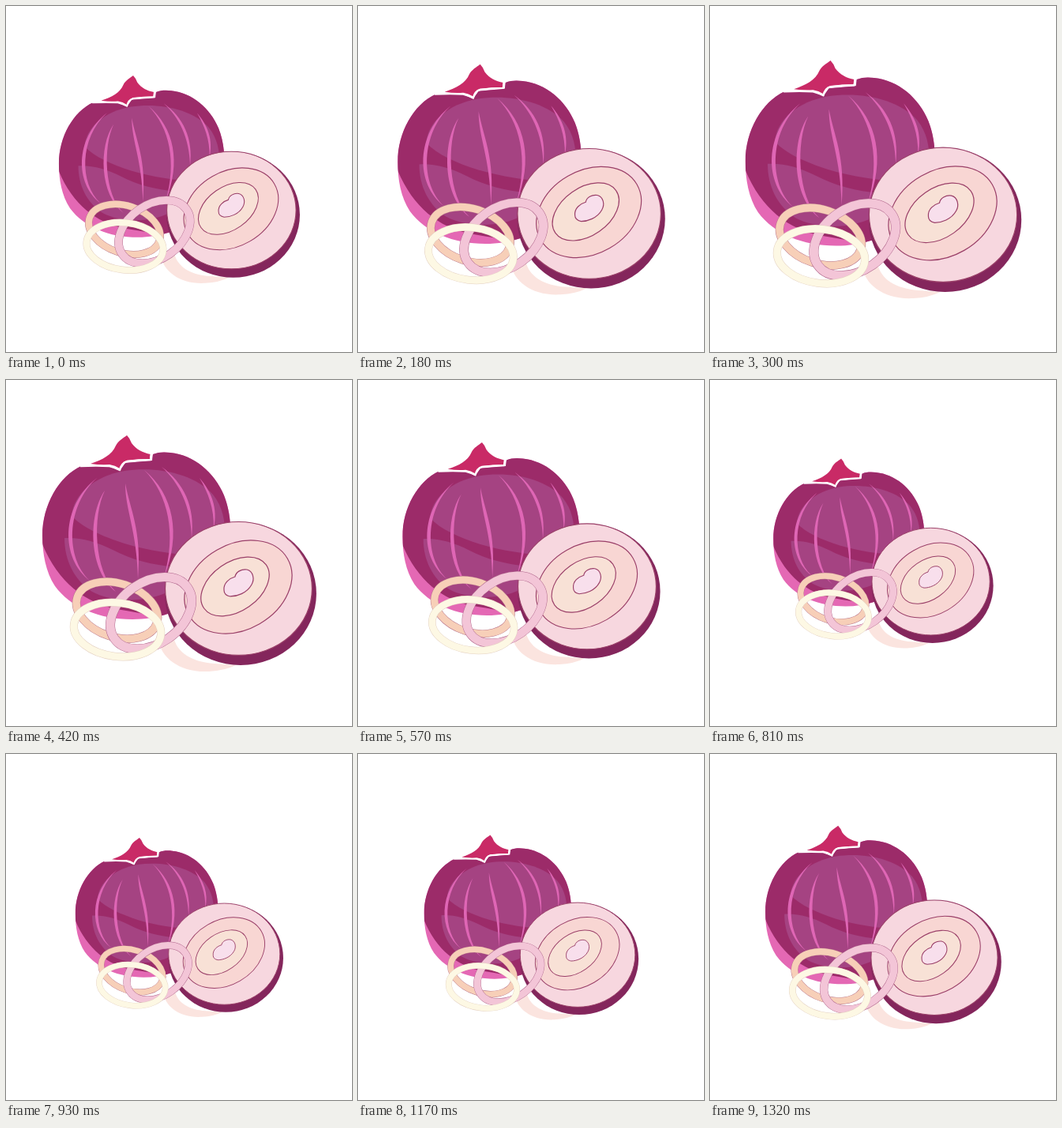
An HTML page that plays this animation: 438 px wide and 438 px high, repeating every 1350 ms.

```html
<!DOCTYPE html>
<html lang="en">
<head>
<meta charset="utf-8">
<title>Red onion</title>
<style>
  html, body { margin: 0; width: 100%; height: 100%; overflow: hidden; background: #fff; }
  svg { display: block; width: 100vw; height: 100vh; }
  .ring { fill: none; }
  .line { stroke: #9a3f68; stroke-width: 1.2; }
</style>
</head>
<body>
<svg viewBox="0 0 438 438">
  <defs>
    <path id="body" d="M95 109 L130 109 L144 115 L151 105 L185 102 L186 94 C193 91 201 91 208 92
      C238 95 264 117 276 146 C284 166 286 190 283 212 C276 262 225 303 160 303
      C118 303 82 288 62 261 C50 243 46 219 46 197 C46 158 67 122 95 109Z"/>
    <clipPath id="inBody"><use href="#body"/></clipPath>
  </defs>
  <g id="onion">
    <!-- whole bulb -->
    <use href="#body" fill="#e468b4"/>
    <g clip-path="url(#inBody)">
      <path fill="#9c2b69" d="M40 80 H300 V300 H200 C185 298 165 294 140 290 C100 282 66 256 46 208Z"/>
      <path fill="#a54382" d="M83 172 C85 145 111 122 150 115 C190 109 238 118 262 145 C274 160 278 178 277 200
        L240 222 C215 221 180 216 150 207 C122 198 97 187 83 172Z"/>
      <path fill="#a54382" d="M74 200 C95 199 115 205 135 215 C160 228 185 234 215 237 L205 268
        C180 281 137 283 109 268 C86 253 74 228 74 200Z"/>
      <g id="stripes" fill="#df66b5"/>
    </g>
    <path fill="#c92a66" d="M153 70 C148 74 142 77 139 83 C134 95 122 101 107 106 Q120 108 131 107
      Q138 108 144 112 Q146 104 153 102 Q168 100 182 100 L183 94 C173 92 165 88 159 80 Q157 74 153 70Z"/>
    <path fill="none" stroke="#fff" stroke-width="2.4" stroke-linejoin="round"
      d="M94 109 Q115 108 131 109 Q139 111 144 114 Q146 105 153 103 Q168 101 183 101 L184 91"/>

    <!-- pale slice under the half -->
    <path fill="#fbe4df" d="M193 329 C196 352 221 371 257 369 Q277 368 291 361 L264 359 C235 357 216 345 212 325Z"/>

    <!-- halved bulb -->
    <ellipse cx="297" cy="270.5" rx="96" ry="90.5" fill="#84265c"/>
    <g class="line">
      <ellipse cx="294.5" cy="264" rx="93" ry="84.5" fill="#f7d7df"/>
      <ellipse rx="72" ry="54" transform="translate(294 262) rotate(-30)" fill="#f8d6d3"/>
      <ellipse rx="48" ry="31" transform="translate(290 261.5) rotate(-35)" fill="#f8e1d6"/>
      <path fill="#f8dfec" d="M276 266 C275 257 283 251 290 249 C291 243 298 239 305 240
        C313 242 315 252 311 259 C305 270 292 274 284 274 C279 273 276 271 276 266Z"/>
    </g>

    <g id="rings"></g>
  </g>
</svg>
<script>
  const LOOP = 1350, STEP = 30, MID = 219;
  const onion = document.getElementById('onion');

  function add(parent, tag, attrs) {
    const el = document.createElementNS('http://www.w3.org/2000/svg', tag);
    for (const k in attrs) el.setAttribute(k, attrs[k]);
    document.getElementById(parent).append(el);
  }

  // Tapered blade: start, two control points, end, half width
  function stripe(x0, y0, ax, ay, bx, by, x1, y1, w) {
    add('stripes', 'path', {
      d: `M${x0} ${y0} C${ax - w} ${ay} ${bx - w} ${by} ${x1} ${y1} ` +
         `C${bx + w} ${by} ${ax + w} ${ay} ${x0} ${y0}Z`
    });
  }

  function ring(x, y, rx, ry, turn, width, color, edge) {
    const base = { rx, ry, class: 'ring', transform: `translate(${x} ${y}) rotate(${turn})` };
    add('rings', 'ellipse', { ...base, stroke: edge, 'stroke-width': width + 1 });
    add('rings', 'ellipse', { ...base, stroke: color, 'stroke-width': width });
  }

  stripe(115, 124, 72, 160, 72, 226, 106, 254, 3.2);
  stripe(125, 140, 106, 172, 108, 242, 139, 268, 3.2);
  stripe(151, 131, 154, 165, 169, 190, 167, 252, 3.2);
  stripe(175, 114, 209, 145, 219, 195, 200, 250, 3.2);
  stripe(197, 110, 222, 130, 237, 160, 235, 200, 2.8);
  stripe(245, 124, 258, 142, 266, 162, 263, 188, 2.4);

  ring(140.5, 291.5, 53, 34, 18, 9.5, '#f7cfb8', '#b8748a');
  ring(183.5, 295, 56.5, 39, -35, 11, '#f3c5d7', '#b0668c');
  ring(141, 316, 55.5, 34, 7, 9, '#fdf8e4', '#e3cfc0');

  function draw() {
    const t = Math.floor(performance.now() % LOOP / STEP) * STEP;
    const s = 0.879 + 0.13 * Math.sin(2 * Math.PI * t / LOOP);
    onion.setAttribute('transform', `translate(${MID} ${MID}) scale(${s}) translate(${-MID} ${-MID})`);
    requestAnimationFrame(draw);
  }
  draw();
</script>
</body>
</html>
```
